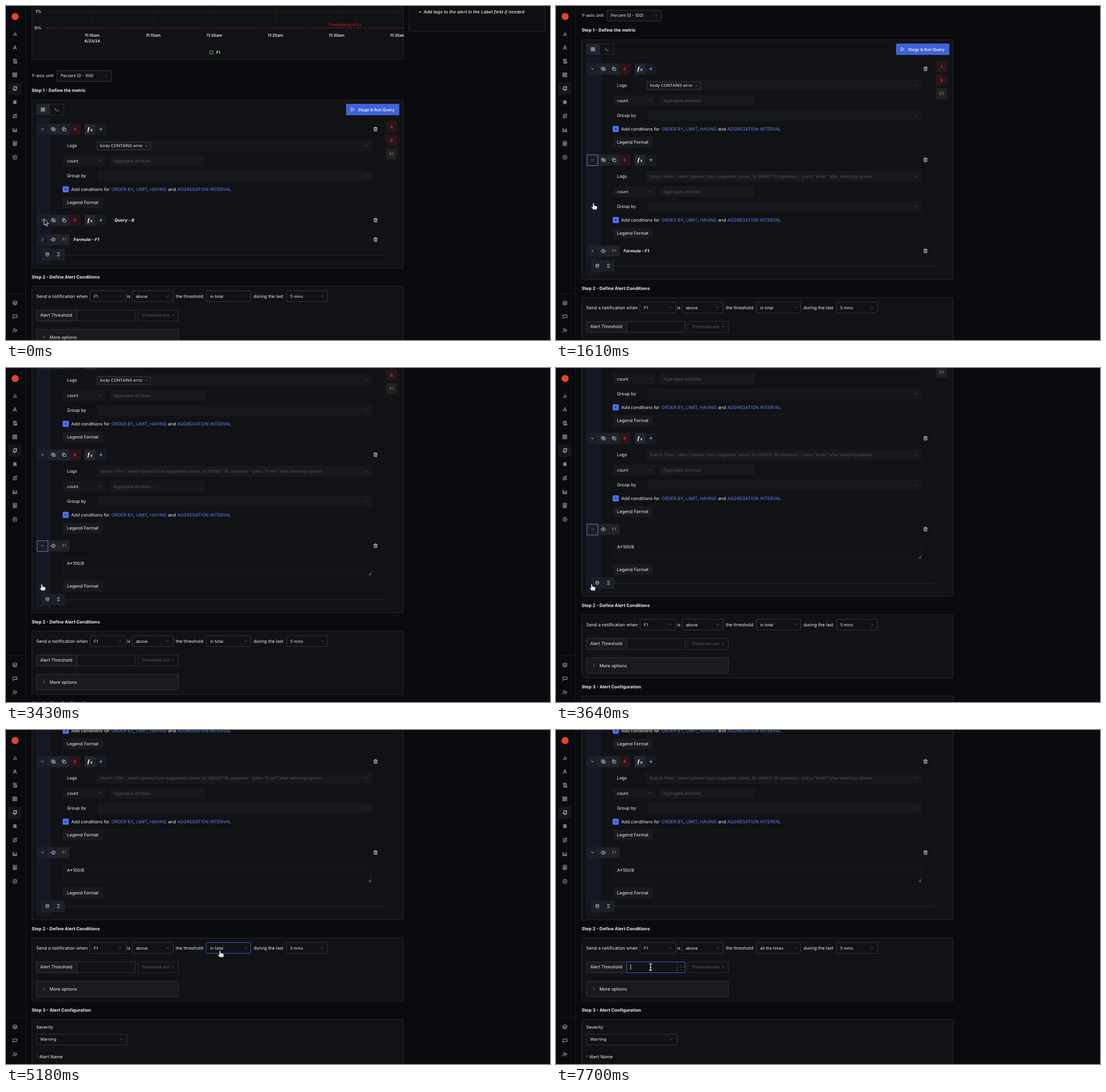
Write an HTML page that moves like this. It is 955 px wide and 587 px high and loops after 8000 ms.

```html
<!DOCTYPE html>
<html lang="en">
<head>
<meta charset="utf-8">
<title>Alert rule</title>
<style>
html, body { margin: 0; width: 100%; height: 100%; overflow: hidden; background: #0a0b0e; }
svg { display: block; width: 955px; height: 587px; font-family: Inter, sans-serif; text-rendering: geometricPrecision; }
text { white-space: pre; }
.ic { fill: none; stroke-linecap: round; stroke-linejoin: round; }
</style>
</head>
<body>
<svg id="stage" viewBox="0 0 955 587"></svg>
<script>
const BG = '#0a0b0e', PANEL = '#111215', EDGE = '#26282d', FIELD = '#17181e', BLUE = '#4e74f8', WHITE = '#eeeff1', DIM = '#53565e';
const BOX = '#32343b', FOCUS = '#3456c8';

// --- drawing helpers; text and icons are placed by their vertical centre ---
const rect = (x, y, w, h, fill = 'none', stroke = 'none', more = '') => {
  // outlined boxes sit on pixel centres so that their edges stay crisp
  if (stroke !== 'none') [x, y, w, h] = [Math.floor(x) + .5, Math.floor(y) + .5, Math.floor(w), Math.floor(h)];
  return `<rect x="${x}" y="${y}" width="${w}" height="${h}" fill="${fill}" stroke="${stroke}" ${more}/>`;
};
const text = (x, y, s, size = 7.75, fill = WHITE, more = '') =>
  `<text x="${x}" y="${y + size * .36}" font-size="${size}" fill="${fill}" ${more}>${s}</text>`;
const line = (x1, y1, x2, y2, stroke, more = '') =>
  `<path d="M${x1} ${y1}L${x2} ${y2}" fill="none" stroke="${stroke}" ${more}/>`;
const icon = (x, y, d, size = 8, stroke = '#d4d6da', more = '') =>
  `<path class="ic" transform="translate(${x - size / 2} ${y - size / 2}) scale(${size / 24})" d="${d}" stroke="${stroke}" stroke-width="2.4" ${more}/>`;
const group = (id, body) => `<g id="${id}">${body}</g>`;

const I = {
  down: 'M5 8l7 8 7-8', right: 'M8 4l8 8-8 8', up: 'M5 16l7-8 7 8',
  eye: 'M1 12s4-8 11-8 11 8 11 8-4 8-11 8S1 12 1 12M12 9a3 3 0 1 0 .1 0',
  copy: 'M9 9h12v12H9zM5 15H3V3h12v2',
  plus: 'M12 3v18M3 12h18',
  cross: 'M5 5l14 14M19 5L5 19',
  trash: 'M3 6h18M5 6v15h14V6M8 6V2h8v4M10 11v6M14 11v6',
  grid: 'M3 3h7v7H3zM14 3h7v7h-7zM14 14h7v7h-7zM3 14h7v7H3z',
  prompt: 'M3 5l7 6-7 6M12 19h10',
  play: 'M5 3l15 9-15 9z',
  base: 'M4 5c0-4 16-4 16 0s-16 4-16 0v14c0 4 16 4 16 0V5M4 12c0 4 16 4 16 0',
  sum: 'M18 7V4H6l7 8-7 8h12v-3'
};
I.hidden = I.eye + 'M3 3l18 18';

const SIDE = [
  [49, 'M18 20V10M12 20V4M6 20v-6'],
  [73, 'M12 3a2 2 0 1 0 .1 0M11 8L5 21M13 8l6 13M4 12c4 5 12 5 16 0'],
  [97, 'M19 17V5a2 2 0 0 0-2-2H4a2 2 0 0 1 2 2v14a2 2 0 0 0 2 2h12a2 2 0 0 0 2-3H11v1a2 2 0 0 1-3 2M10 8h5M10 12h5'],
  [121, I.grid],
  [145, 'M19 12c0 4 2 5 2 5H3s3-2 3-9a6 6 0 0 1 7-6M10 21h4M18 3a3 3 0 1 0 .1 0'],
  [169, 'M8 10a4 4 0 0 1 8 0v5a4 4 0 0 1-8 0zM12 9v10M3 13h5M16 13h5M4 5l4 4M20 5l-4 4M4 21l4-4M20 21l-4-4M9 6a3 3 0 0 1 6 0'],
  [193.5, 'M6 16a3 3 0 1 0 .1 0M9 19h8a3.5 3.5 0 0 0 0-7H7a3.5 3.5 0 0 1 0-7h8M18 2a3 3 0 1 0 .1 0'],
  [217.5, 'M3 3v18h18M7 17v-5l4-4 4 4 5-5v10z'],
  [242, 'M4 2v20l3-2 3 2 3-2 3 2 4-2V2zM15 8h-5a2 2 0 0 0 0 4h3a2 2 0 0 1 0 4H8M12 6v12'],
  [266, 'M12 9a3 3 0 1 0 .1 0M12 2l3 2h4l1 4 2 4-2 4-1 4h-4l-3 2-3-2H5l-1-4-2-4 2-4 1-4h4z'],
  [522, 'M12 2L2 7l10 5 10-5zM2 12l10 5 10-5M2 17l10 5 10-5'],
  [546, 'M21 16H8l-5 5V4h18z'],
  [570, 'M2 21v-2a4 4 0 0 1 4-4h6a4 4 0 0 1 4 4v2M9 3a4 4 0 1 0 .1 0M19 8v6M16 11h6']
];

const panel = (x, y, w, h, more = '') => rect(x, y, w, h, PANEL, EDGE, `rx="2" ${more}`);
const heading = (y, s) => text(45, y, s, 7.75, WHITE, 'font-weight="700"');
const select = (x, y, w, s, fill = WHITE, edge = BOX, id = '') =>
  rect(x, y - 9.5, w, 19.5, PANEL, edge, `rx="1" ${id && `id="${id}Box"`}`) +
  text(x + 7, y, s, 7.22, fill, id && `id="${id}Text"`) + icon(x + w - 9.5, y, I.down, 6, '#7a7d85');
const cell = (x, y, fill, body, w = 19) => rect(x, y - 9.5, w, 19.5, fill) + body;
const tag = (x, y, s, hot) => cell(x, y, hot ? '#2a151a' : '#222225',
  text(x + 9.5, y, s, 7.3, hot ? '#d84353' : '#cf8a62', 'text-anchor="middle"'));

// --- parts of the query builder ---
function toolbar(y, name, id) {
  const formula = name === 'F1';
  let s = cell(54.5, y, '#1b1e29', icon(64.2, y, formula || id === 'b' ? I.right : I.down, 7, WHITE, `id="${id}Arrow"`)) +
    cell(73.8, y, '#1f222d', icon(83.2, y, formula ? I.eye : I.hidden, 9));
  if (formula) s += tag(92.5, y, name, false);
  else s += cell(92.5, y, '#1f222d', icon(102, y, I.copy, 8)) + tag(111.5, y, name, true) +
    cell(138, y, '#23262f', `<text x="142.3" y="${y + 3}" font-family="Liberation Serif, serif" font-style="italic" font-weight="700" font-size="11" fill="#fff">ƒ<tspan font-size="8.5">x</tspan></text>`) +
    cell(157, y, '#171a24', icon(166.5, y, I.plus, 7));
  return s + line(73.5, y - 9.5, 73.5, y + 10, '#2b2e3a', 'stroke-width=".6"') +
    line(92.5, y - 9.5, 92.5, y + 10, '#2b2e3a', 'stroke-width=".6"') +
    rect(54.5, y - 9.5, 19, 19, 'none', '#66749b', `id="${id}Ring" visibility="hidden"`) +
    icon(648.7, y, I.trash, 8.5);
}

const legend = y => rect(100.5, y - 9, 541.5, 18.5, 'none', '#18191d') +
  rect(100, y - 9.5, 70.5, 19, '#191a1f') + text(107, y, 'Legend Format');

function fields(y, search) {
  const words = [[185, 'ORDER BY', 1], [223.8, ','], [228, 'LIMIT', 1], [248, ','], [252.5, 'HAVING', 1], [284.5, 'and'], [300.5, 'AGGREGATION INTERVAL', 1]];
  return text(107, y + 29, 'Logs') + rect(157, y + 19.5, 485, 19, FIELD) + search(y + 29) +
    icon(632.5, y + 29.5, I.down, 6, '#55585f') +
    rect(100, y + 46, 74, 19.5, FIELD) + text(107, y + 55.5, 'count', 7.3) + icon(165, y + 55.5, I.down, 6, '#6a6d75') +
    rect(181, y + 46, 168, 19.5, FIELD) + text(188, y + 55.5, 'Aggregate attribute', 7.22, DIM) +
    text(107, y + 82, 'Group by') + rect(161, y + 72.5, 481, 19, FIELD) + icon(632.5, y + 82, I.down, 6, '#55585f') +
    rect(99.5, y + 100.3, 10.7, 10.7, BLUE, 'none', 'rx="1.5"') + icon(104.9, y + 105.6, I.plus, 6, '#10131c') +
    text(114.5, y + 105.5, 'Add conditions for') +
    words.map(([x, s, link]) => text(x, y + 105.5, s, 7.75, link ? '#5f83f7' : WHITE)).join('') +
    legend(y + 129);
}

const chip = y => rect(160.5, y - 6.5, 93, 13, '#15161a', '#383b43') +
  text(165, y, 'body CONTAINS error', 7.2) + icon(246.5, y + .5, I.cross, 5, '#9a9ca3');
const hint = y => text(164, y, 'Search Filter : select options from suggested values, for IN/NOT IN operators - press "Enter" after selecting options', 7.2, DIM);

// --- page sections ---
function chart() {
  const label = (x, y, s, anchor) => text(x, y, s, 7, WHITE, `font-weight="600" text-anchor="${anchor}"`);
  let s = panel(45.5, -20, 652.5, 113.5) + line(70, 9.5, 698, 9.5, '#1d1e22');
  for (let i = 0; i < 6; i++) {
    const x = 151.2 + i * 107.3;
    s += line(x, 0, x, 38, '#1a1b1f') + label(x, 51, `11:${10 + i * 5}am`, 'middle');
  }
  return `<g clip-path="url(#chartClip)">${s}</g>` + label(62, 9, '1%', 'end') +
    label(62, 38.5, '0%', 'end') + label(151.2, 61.5, '4/23/24', 'middle') +
    line(70, 38.5, 698, 38.5, '#a11d22', 'stroke-dasharray="4 2.5"') +
    text(565.5, 33, 'Threshold (y=0%)', 6.5, '#b3171c', 'font-weight="700"') +
    '<circle cx="360.5" cy="81.5" r="3" fill="none" stroke="#58a65c" stroke-width="1.2"/>' + label(369, 81.5, 'F1', 'start');
}

function conditions() {
  return heading(476.5, 'Step 2 - Define Alert Conditions') + panel(45.5, 492.5, 652.5, 111) +
    text(53, 510, 'Send a notification when') + select(147, 510, 63, 'F1') + text(212.5, 510, 'is') +
    select(221, 510, 72, 'above') + text(298, 510, 'the threshold') +
    select(351.5, 510, 78.5, 'in total', WHITE, BOX, 'match') +
    text(434.5, 510, 'during the last') + select(492, 510, 72.5, '5 mins') +
    rect(53, 534, 173, 19, PANEL, BOX) + rect(53, 534, 71, 19, '#191a1f', BOX) + text(60, 543.5, 'Alert Threshold') +
    group('spin', line(212.5, 534, 212.5, 553, BOX) + line(212.5, 543.5, 226, 543.5, BOX) +
      icon(219.3, 539, I.up, 4.5, '#777a82') + icon(219.3, 548.5, I.down, 4.5, '#777a82')) +
    rect(124, 534, 102, 19, 'none', FOCUS, 'id="inputBox"') +
    line(131, 539, 131, 548.5, '#fff', 'id="caret" stroke-width=".9"') +
    select(231, 543.5, 71.5, 'Threshold unit', '#5d6068', '#2c2e34') +
    rect(53, 568, 249.5, 27.5, '#191a1d', BOX, 'rx="1"') + icon(66.5, 582, I.right, 6) + text(76.3, 582, 'More options') +
    heading(619.5, 'Step 3 - Alert Configuration') + panel(45.5, 635.5, 652.5, 200) + text(53, 649.5, 'Severity') +
    select(53, 670.5, 159, 'Warning') + text(53, 701.5, '*', 7.75, '#d8353c') + text(58.5, 701, 'Alert Name') +
    group('menu', rect(351.5, 523, 79, 77, '#1c1d22', '#25272d', 'rx="2"') +
      rect(353.5, 0, 75, 18.2, '#30333b', 'none', 'id="menuHover" rx="1"') +
      ['at least once', 'all the times', 'on average', 'in total'].map((s, i) => text(358.5, 534.2 + i * 18.3, s, 7.22)).join(''));
}

const builder = panel(45.5, 165, 652.5, 295, 'id="frame"') +
  rect(53, 196, 26, 256.5, '#151824', 'none', 'id="strip"') +
  rect(53.5, 196.5, 636.5, 256, 'none', '#1e2027', 'id="inner" stroke-dasharray="2 1.5" stroke-width=".8"') +
  line(664.5, 0, 664.5, 256, '#1e2027', 'id="split" stroke-dasharray="2 1.5" stroke-width=".8"') +
  rect(53, 172.5, 48.5, 19, PANEL, '#292b32') + rect(53, 172.5, 24, 19, '#22252f') +
  icon(65, 182, I.grid, 8) + icon(89, 182, I.prompt, 7.5) +
  rect(597, 172, 93.5, 20, '#4063d8', 'none', 'rx="1"') + icon(608.7, 182, I.play, 8, '#fff') +
  text(617.8, 182, 'Stage &amp; Run Query', 7.15, '#fff', 'font-weight="500"') +
  tag(667.5, 212, 'A', true) + tag(667.5, 236, 'B', true) + tag(667.5, 260, 'F1', false) +
  toolbar(216.5, 'A', 'a') + fields(216.5, chip) + toolbar(376.5, 'B', 'b');

const italic = 'font-style="italic" font-weight="700"';
const page = chart() +
  rect(707.5, -20, 239, 64, '#0e0f12', '#222429', 'rx="2"') + '<circle cx="727" cy="10.5" r="1.2" fill="#e8e9ec"/>' +
  text(733, 10, 'Add tags to the alert in the Label field if needed', 7.8, WHITE, 'font-style="italic" font-weight="500"') +
  text(45, 122.5, 'Y-axis unit') + select(89, 122.5, 96.5, 'Percent (0 - 100)') +
  heading(148, 'Step 1 - Define the metric') + builder +
  group('bLabel', text(190.5, 376.5, 'Query - B', 7.55, WHITE, italic)) + group('bBody', fields(376.5, hint)) +
  group('formula', toolbar(410.5, 'F1', 'f') +
    group('fLabel', text(118.5, 410.5, 'Formula - F1', 7.5, WHITE, italic)) +
    group('fBody', rect(100.5, 431.5, 541.5, 31.5, '#121317', '#18191d') + text(107, 441, 'A*100/B', 7.6) +
      line(636.5, 462, 641, 457.5, '#b5b7bc', 'stroke-width=".8"') + line(639, 462, 641, 460, '#b5b7bc', 'stroke-width=".8"') + legend(481))) +
  group('lower', line(102, 437.5, 664, 437.5, '#24283c') + rect(62.5, 427, 40, 19.5, '#1c1e28', '#262934', 'stroke-width=".6"') +
    icon(72.5, 436.5, I.base, 7.5) + icon(92, 436.5, I.sum, 8) + conditions());

const side = rect(0, 0, 35, 587, BG) + line(34.5, 0, 34.5, 587, '#17191e') + line(0, 505.5, 35, 505.5, '#17191e') +
  rect(4, 134.5, 23, 21.5, '#15171c', 'none', 'rx="2"') + '<circle cx="16" cy="18.5" r="6.2" fill="#e5432f"/>' +
  SIDE.map(([y, d]) => icon(15.6, y, d, 9, y === 145 ? '#fff' : '#b6b8bf')).join('');

const outline = 'fill="#000" stroke="#fff" stroke-width=".9" stroke-linejoin="round"';
const cursors = group('mouse',
  group('arrow', `<path d="M0 0v11l2.5-2.2 1.7 4 1.8-.8-1.7-3.8h3.4z" ${outline}/>`) +
  group('hand', `<path d="M-1-.2c.7-.8 1.8-.5 2 .5l.6 3.5 4 .9c1.1.3 1.5 1 1.3 2l-.7 4.300H-.2L-3.300 7c-.6-.9.5-1.6 1.3-.9l1 .9z" fill="#fff" stroke="#111" stroke-width=".7"/><path d="M2 7.5v2M3.700 7.500v2" stroke="#111" stroke-width=".5"/>`) +
  group('beam', '<path d="M-2.5-6q2.5 0 2.5 2v8q0 2 2.5 2M2.500-6Q0-6 0-4M0 4q0 2-2.5 2M-1.2 1h2.4" fill="none" stroke="#fff" stroke-width="1.1"/>'));

const stage = document.getElementById('stage');
stage.innerHTML = '<clipPath id="chartClip"><rect x="45" y="-30" width="653.5" height="125"/></clipPath>' +
  group('page', page) + side + cursors;

// --- motion ---
const el = id => document.getElementById(id);
const set = (id, name, v) => el(id).setAttribute(name, v);
const show = (id, on) => set(id, 'visibility', on ? 'visible' : 'hidden');
const shift = (id, y) => set(id, 'transform', `translate(0 ${y})`);

// keys: [time, values, ease-out power]
function track(keys, t) {
  let a = keys[0];
  for (const b of keys) {
    if (t < b[0]) {
      const k = 1 - Math.pow(1 - (t - a[0]) / (b[0] - a[0]), b[2] || 1);
      return a[1].map((v, i) => v + (b[1][i] - v) * k);
    }
    a = b;
  }
  return a[1];
}

const SCROLL = [[0, [0]], [560, [24], 4], [1330, [24]], [2170, [154], 2.45], [3010, [154]],
  [3430, [224]], [3990, [300]], [4270, [321], 1.6]];
const MOUSE = [[0, [67, 374]], [210, [67, 374]], [560, [65.5, 347], 2], [2100, [65.5, 347]], [2450, [62.5, 380.3], 2],
  [4410, [62.5, 380.3]], [4690, [120, 354]], [5040, [350, 398], 1.3], [5180, [375.5, 388.5], 2], [5600, [375.5, 388.5]],
  [6440, [380, 423], 1.6], [6580, [380, 423]], [7210, [176, 419], 1.8], [7420, [166, 416.5], 2]];

function pointer(t) {
  if (t >= 7140) return 'beam';
  const hand = (t >= 490 && t < 2100) || (t >= 2380 && t < 3920) || (t >= 5040 && t < 6720);
  return hand ? 'hand' : 'arrow';
}

function draw(t) {
  const bOpen = t >= 840, fOpen = t >= 2520, d1 = bOpen ? 126 : 0, d2 = d1 + (fOpen ? 68 : 0);
  shift('page', -Math.round(track(SCROLL, t)[0]));
  shift('formula', d1);
  shift('lower', d2);
  set('frame', 'height', 295 + d2);
  set('strip', 'height', 256.5 + d2);
  set('inner', 'height', 256 + d2);
  set('split', 'd', `M664.5 196.5V${452.5 + d2}`);

  show('bBody', bOpen);
  show('bLabel', !bOpen);
  show('fBody', fOpen);
  show('fLabel', !fOpen);
  const bFocus = bOpen && t < 2450, fFocus = t >= 2450 && t < 4970;
  set('bArrow', 'd', bOpen ? I.down : I.right);
  set('fArrow', 'd', fOpen ? I.down : I.right);
  set('bArrow', 'stroke', bFocus ? '#6d8df5' : WHITE);
  set('fArrow', 'stroke', fFocus ? '#6d8df5' : WHITE);
  show('bRing', bFocus);
  show('fRing', fFocus);

  const picked = t >= 6510, open = t >= 5320 && t < 6720;
  set('matchBox', 'stroke', t >= 5040 && t < 7490 ? FOCUS : BOX);
  el('matchText').textContent = picked ? 'all the times' : 'in total';
  set('matchText', 'opacity', open && !picked ? .4 : 1);
  set('menu', 'opacity', t < 6510 ? Math.min(1, Math.max(0, (t - 5250) / 210)) : Math.max(0, 1 - (t - 6510) / 210));
  set('menuHover', 'y', t < 6020 ? 579.9 : t < 6230 ? 525 : 543.3);

  show('inputBox', t >= 7140);
  show('spin', t >= 7140);
  show('caret', t >= 7490);

  const [x, y] = track(MOUSE, t), kind = pointer(t);
  set('mouse', 'transform', `translate(${x} ${y})`);
  for (const k of ['arrow', 'hand', 'beam']) show(k, k === kind);
}

let start;
function loop(now) {
  start ??= now;
  draw(Math.floor((now - start) % 8000 / 70) * 70);
  requestAnimationFrame(loop);
}
draw(0);
requestAnimationFrame(loop);
</script>
</body>
</html>
```
